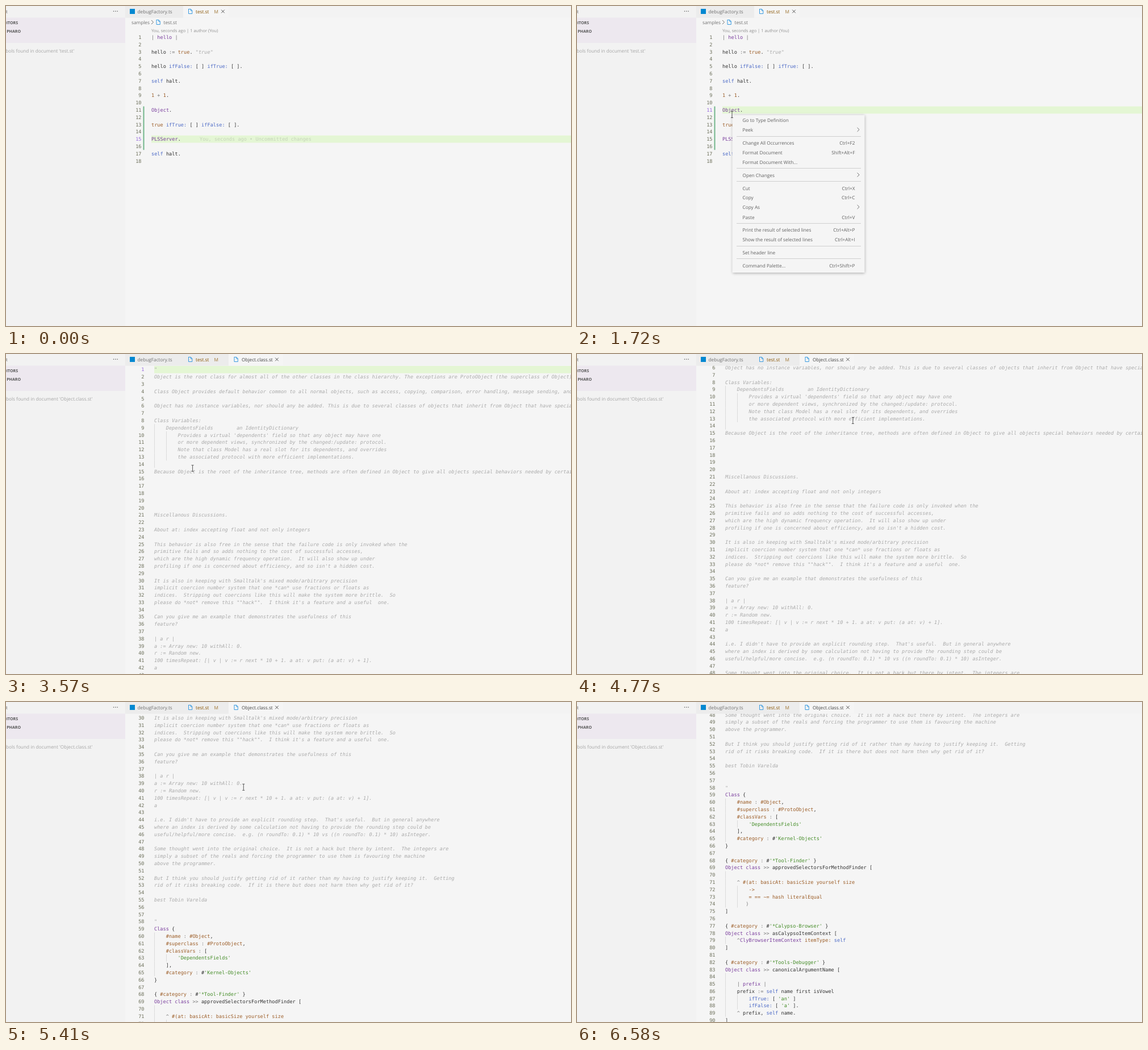
Recreate the animation shown at these times as an HTML page with a canvas. Size 995 px wide and 563 px high, loop 6910 ms.

```html
<!DOCTYPE html>
<html lang="en">
<head>
<meta charset="utf-8">
<title>Go to Type Definition</title>
<style>
html, body { margin: 0; width: 100%; height: 100%; overflow: hidden; background: #f5f5f5; }
canvas { display: block; width: 995px; height: 563px; }
</style>
</head>
<body>
<canvas id="stage" width="995" height="563"></canvas>
<script>
const ctx = document.getElementById('stage').getContext('2d');
const LOOP = 6910, W = 995, H = 563;
const PITCH = 12.797, NOTCH = 33.68;
const MONO = '8.614px "DejaVu Sans Mono", monospace';
const UI = '"Open Sans", "Noto Sans", sans-serif';
const C = {
  editor: '#f5f5f5', side: '#f2f2f2', section: '#ede8ef', tabBar: '#f3f3f3', tabOff: '#ececec',
  line: '#e4f6d4', select: '#c4d9b1', text: '#333333', punct: '#777777', comment: '#aaaaaa',
  keyword: '#4b69c6', type: '#7a3e9d', string: '#448c27', constant: '#9c5d27',
  number: '#6d705b', active: '#9769dc', modified: '#895503', label: '#616161', icon: '#3a9be0'
};

const script = `| hello |

hello := true. "true"

hello ifFalse: [ ] ifTrue: [ ].

self halt.

1 + 1.

Object.

true ifTrue: [ ] ifFalse: [ ].

PLSServer.

self halt.
`;

const classComment = `"
Object is the root class for almost all of the other classes in the class hierarchy. The exceptions are ProtoObject (the superclass of Object) and its subclasses.

Class Object provides default behavior common to all normal objects, such as access, copying, comparison, error handling, message sending, and reflection.

Object has no instance variables, nor should any be added. This is due to several classes of objects that inherit from Object that have special implementations

Class Variables:
    DependentsFields        an IdentityDictionary
        Provides a virtual 'dependents' field so that any object may have one
        or more dependent views, synchronized by the changed:/update: protocol.
        Note that class Model has a real slot for its dependents, and overrides
        the associated protocol with more efficient implementations.

Because Object is the root of the inheritance tree, methods are often defined in Object to give all objects special behaviors needed by certain subclasses





Miscellanous Discussions.

About at: index accepting float and not only integers

This behavior is also free in the sense that the failure code is only invoked when the
primitive fails and so adds nothing to the cost of successful accesses,
which are the high dynamic frequency operation.  It will also show up under
profiling if one is concerned about efficiency, and so isn't a hidden cost.

It is also in keeping with Smalltalk's mixed mode/arbitrary precision
implicit coercion number system that one *can* use fractions or floats as
indices.  Stripping out coercions like this will make the system more brittle.  So
please do *not* remove this ""hack"".  I think it's a feature and a useful  one.

Can you give me an example that demonstrates the usefulness of this
feature?

| a r |
a := Array new: 10 withAll: 0.
r := Random new.
100 timesRepeat: [| v | v := r next * 10 + 1. a at: v put: (a at: v) + 1].
a

i.e. I didn't have to provide an explicit rounding step.  That's useful.  But in general anywhere
where an index is derived by some calculation not having to provide the rounding step could be
useful/helpful/more concise.  e.g. (n roundTo: 0.1) * 10 vs ((n roundTo: 0.1) * 10) asInteger.

Some thought went into the original choice.  It is not a hack but there by intent.  The integers are
simply a subset of the reals and forcing the programmer to use them is favouring the machine
above the programmer.

But I think you should justify getting rid of it rather than my having to justify keeping it.  Getting
rid of it risks breaking code.  If it is there but does not harm then why get rid of it?

best Tobin Varelda


"`;

const classCode = `Class {
    #name : #Object,
    #superclass : #ProtoObject,
    #classVars : [
        'DependentsFields'
    ],
    #category : #'Kernel-Objects'
}

{ #category : #'*Tool-Finder' }
Object class >> approvedSelectorsForMethodFinder [

    ^ #(at: basicAt: basicSize yourself size
        ->
        = == ~= hash literalEqual
       )
]

{ #category : #'*Calypso-Browser' }
Object class >> asCalypsoItemContext [
    ^ClyBrowserItemContext itemType: self
]

{ #category : #'*Tools-Debugger' }
Object class >> canonicalArgumentName [

    | prefix |
    prefix := self name first isVowel
        ifTrue: [ 'an' ]
        ifFalse: [ 'a' ].
    ^ prefix, self name.
]`;

function colorOf(word, declares) {
  if (word[0] === "'") return C.string;
  if (word[0] === '"') return C.comment;
  if (/^(self|if(True|False):)$/.test(word)) return C.keyword;
  if (/^(#\w|\d|true$|\w+:$)/.test(word)) return C.constant;
  if (/^([A-Z]|class$)/.test(word) || (declares && /\w/.test(word))) return C.type;
  return /^[\w[\]{}.,#]/.test(word) ? C.text : C.punct;
}

// Splits source into lines of coloured words with their columns.
function tokenize(source) {
  let inArray = false;
  return source.split('\n').map(line => {
    const declares = /^\s*\|/.test(line);
    const words = line.matchAll(/"[^"]*"|'[^']*'|#\w+|#\(|\w+:(?!=)|\w+|\S/g);
    return Array.from(words, ({ 0: word, index: col }) => {
      if (word === '#(') inArray = true;
      if (word === ')') inArray = false;
      return { word, col, color: inArray ? C.constant : colorOf(word, declares) };
    });
  });
}

// Indent guide depth per line; blank lines borrow from their neighbours.
function guideDepths(source) {
  const own = source.split('\n').map(s => s.trim() ? Math.ceil(s.search(/\S/) / 4) : -1);
  return own.map((d, i) => {
    if (d >= 0) return d;
    const up = own.slice(0, i).reverse().find(v => v >= 0) ?? 0;
    const down = own.slice(i).find(v => v >= 0) ?? 0;
    return up === down ? up : 1 + Math.min(up, down);
  });
}

const asComment = text => text.split('\n').map(word => [{ word, col: 0, color: C.comment }]);
const scriptDoc = { x: 256, top: 55, lines: tokenize(script), depths: guideDepths(script) };
const classDoc = {
  x: 261, top: 27.4,
  lines: [...asComment(classComment), ...tokenize(classCode)],
  depths: guideDepths(classComment + '\n' + classCode)
};

function rect(x, y, w, h, color) {
  ctx.fillStyle = color;
  ctx.fillRect(x, y, w, h);
}

function text(str, x, y, color, font, align = 'left') {
  ctx.font = font;
  ctx.fillStyle = color;
  ctx.textAlign = align;
  ctx.fillText(str, x, y);
}

const label = (str, x, y, color = C.label, size = 8.25, align = 'left', weight = '') =>
  text(str, x, y + 3, color, `${weight} ${size}px ${UI}`, align);

function stroke(color, width, ...lines) {
  ctx.strokeStyle = color;
  ctx.lineWidth = width;
  ctx.beginPath();
  for (const line of lines) {
    line.forEach(([x, y], i) => i ? ctx.lineTo(x, y) : ctx.moveTo(x, y));
  }
  ctx.stroke();
}

const chevron = (x, y) => stroke(C.label, 0.9, [[x - 2, y - 3.5], [x + 1.6, y], [x - 2, y + 3.5]]);
const closeIcon = (x, y) =>
  stroke('#555', 1, [[x - 2.8, y - 2.8], [x + 2.8, y + 2.8]], [[x + 2.8, y - 2.8], [x - 2.8, y + 2.8]]);

function fileIcon(x, y) {
  stroke(C.icon, 1,
    [[x - 3, y - 4], [x + 1, y - 4], [x + 3.3, y - 1.5], [x + 3.3, y + 4], [x - 3, y + 4], [x - 3, y - 4.5]],
    [[x + 0.8, y - 4], [x + 0.8, y - 1.3], [x + 3.3, y - 1.3]]);
}

function drawDoc(doc, activeLine, offset = 0) {
  ctx.font = MONO;
  const cell = ctx.measureText('0').width;
  doc.lines.forEach((words, i) => {
    const y = doc.top + i * PITCH - offset;
    if (y < 8 || y > H + 8) return;
    const isActive = i + 1 === activeLine;
    if (isActive) rect(doc.x, y - 6.4, W - doc.x, 12.8, C.line);
    for (let d = 0; d < doc.depths[i]; d++) {
      rect(Math.round(doc.x + d * 4 * cell), y - 6.4, 1, PITCH, '#dadada');
    }
    text(i + 1, doc.x - 17.5, y + 3, isActive ? C.active : C.number, MONO, 'right');
    for (const { word, col, color } of words) {
      const font = color === C.comment ? 'italic ' + MONO : MONO;
      text(word, doc.x + col * cell, y + 3, color, font);
    }
  });
}

function drawSidebar(file) {
  rect(0, 0, 210, H, C.side);
  rect(0, 20.5, 210, 44.5, C.section);
  label('EXPLORER', 2.5, 9.5, C.label, 7.4, 'right');
  for (const x of [189.5, 192.8, 196.1]) rect(x - 0.6, 8.6, 1.3, 1.3, '#555');
  label('OPEN EDITORS', 21, 28.5, '#555', 7, 'right', 'bold');
  label('PHARO', 26, 43.5, '#555', 7, 'right', 'bold');
  label(`No symbols found in document '${file}'`, file === 'test.st' ? 120.5 : 152.5, 78.5, '#a6a6a6', 8.25, 'right');
}

function drawTabs(classOpen) {
  rect(210, 0, W - 210, 20.5, C.tabBar);
  rect(210, 0, 102, 20.5, C.tabOff);
  rect(312, 0, 80, 20.5, classOpen ? C.tabOff : C.editor);
  rect(218, 5, 9, 9, '#0288d1');
  label('debugFactory.ts', 231.5, 9.8, '#707070');
  fileIcon(324.5, 9.5);
  label('test.st', 334, 9.8, C.modified);
  label('M', 366.5, 9.5, '#a07838');
  if (classOpen) {
    rect(392, 0, 96, 20.5, C.editor);
    fileIcon(405, 9.5);
    label('Object.class.st', 415, 9.8, '#444');
    closeIcon(477, 9.5);
  } else {
    closeIcon(382, 9.5);
  }
}

function drawScript(t) {
  const line = t < 290 ? 15 : t < 1720 ? 16 : 11;
  label('samples', 221, 28.8, '#707070');
  chevron(258, 28.5);
  fileIcon(268, 28.5);
  label('test.st', 277.5, 28.8, '#707070');
  label('You, seconds ago | 1 author (You)', 256, 42.5, '#919191', 7.5);
  drawDoc(scriptDoc, line);
  rect(241.5, 176.6, 2, 76.6, '#73b68b');
  const blameX = line === 15 ? 341 : t >= 1950 ? 325.5 : 0;
  if (blameX) {
    text('You, seconds ago • Uncommitted changes', blameX, scriptDoc.top + (line - 1) * PITCH + 3, '#c5d4b9', MONO);
  }
  if (line === 16 && Math.floor(t / 500) % 2 === 0) rect(256, 240.5, 1.2, 12.8, '#222');
}

const SUB = '>';
const menu = [
  [201, 'Go to Type Definition'], [218, 'Peek', SUB], [229],
  [241, 'Change All Occurrences', 'Ctrl+F2'], [258, 'Format Document', 'Shift+Alt+F'],
  [274.5, 'Format Document With...'], [285.5], [297.5, 'Open Changes', SUB], [308],
  [320.5, 'Cut', 'Ctrl+X'], [337.3, 'Copy', 'Ctrl+C'], [354, 'Copy As', SUB], [371.5, 'Paste', 'Ctrl+V'], [382.3],
  [394, 'Print the result of selected lines', 'Ctrl+Alt+P'],
  [411, 'Show the result of selected lines', 'Ctrl+Alt+I'], [422],
  [433.5, 'Set header line'], [444], [456.5, 'Command Palette...', 'Ctrl+Shift+P']
];

function drawMenu(hovered) {
  ctx.save();
  ctx.shadowColor = 'rgba(0,0,0,0.32)';
  ctx.shadowBlur = 5;
  ctx.shadowOffsetY = 1;
  rect(273.5, 192, 233, 277, C.editor);
  ctx.restore();
  if (hovered) rect(274, 193, 232, 15, C.select);
  for (const [y, name, hint] of menu) {
    if (!name) {
      rect(281, Math.floor(y), 219, 1, '#cfcfcf');
      continue;
    }
    label(name, 291.5, y);
    if (hint === SUB) chevron(495.5, y - 0.5);
    else if (hint) label(hint, 489.5, y, C.label, 8.25, 'right');
  }
}

// Pointer waypoints: time, x, y.
const path = [
  [240, 568, 500], [400, 511, 415], [520, 465, 357], [680, 418, 310], [820, 378, 265],
  [930, 338, 234], [1130, 292, 196], [1670, 273, 191], [2090, 273, 191], [2240, 331, 202],
  [3890, 328, 201], [4250, 498, 86], [4580, 486, 117], [4770, 486, 117],
  [5110, 447, 123], [5760, 385, 181], [6100, 344, 206], [6190, 344, 206],
  [6380, 440, 350], [6580, 593, 575]
];

function pointerAt(t) {
  const i = path.findIndex(p => p[0] > t);
  if (i < 1) return null;
  const [t0, x0, y0] = path[i - 1], [t1, x1, y1] = path[i];
  const k = (t - t0) / (t1 - t0);
  return [x0 + (x1 - x0) * k, y0 + (y1 - y0) * k];
}

function drawPointer(t) {
  const at = pointerAt(t);
  if (!at) return;
  const [x, y] = at;
  if (t >= 2750 && t < 2900) {
    ctx.fillStyle = `rgba(238,220,40,${t < 2800 ? 0.85 : 0.85 * (2900 - t) / 100})`;
    ctx.beginPath();
    ctx.arc(x, y - 1, 8, 0, Math.PI * 2);
    ctx.fill();
  }
  if (t >= 2140 && t < 2850) {
    ctx.fillStyle = '#444';
    ctx.beginPath();
    [[0, 0], [1.6, 0], [2, 3.2], [6, 4], [6, 7], [5, 9.5], [1, 9.5], [-2, 5.5], [-1, 4.8], [0, 5.5]]
      .forEach(([dx, dy]) => ctx.lineTo(x + dx, y + dy));
    ctx.fill();
  } else {
    stroke('#555', 1,
      [[x, y - 5], [x, y + 5]],
      [[x - 2, y - 5.5], [x + 2, y - 5.5]],
      [[x - 2, y + 5.5], [x + 2, y + 5.5]]);
  }
}

function scrollAt(t) {
  const notches = Math.floor(2 + (t - 4765) / 68.5);
  return NOTCH * Math.min(18, Math.max(0, notches));
}

function draw(t) {
  const classOpen = t >= 2850;
  ctx.textBaseline = 'alphabetic';
  ctx.textRendering = 'geometricPrecision';
  rect(0, 0, W, H, C.editor);
  if (!classOpen) drawScript(t);
  else if (t >= 3430) drawDoc(classDoc, 1, scrollAt(t));
  drawSidebar(t < 3480 ? 'test.st' : 'Object.class.st');
  drawTabs(classOpen);
  if (t >= 3090 && t < 3290) rect(214 + (t - 3090) * 0.22, 19, 16, 2, '#705697');
  if (t >= 1720 && t < 2800) drawMenu(t >= 2140);
  drawPointer(t);
}

const start = performance.now();
function frame() {
  draw((performance.now() - start) % LOOP);
  requestAnimationFrame(frame);
}
frame();
</script>
</body>
</html>
```
